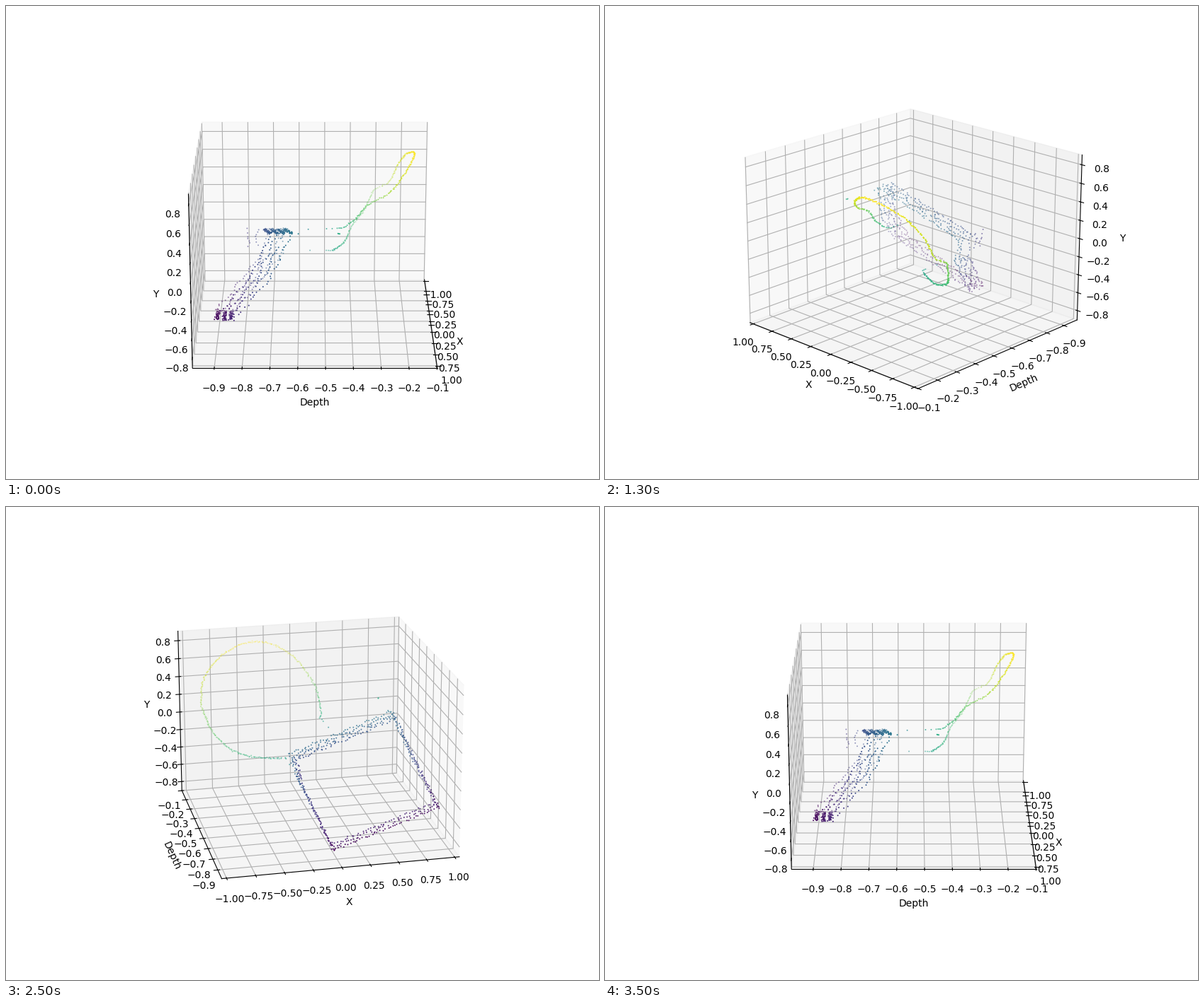
Animation, 837 px wide and 669 px high, one loop 3.6 s. Source, as a matplotlib script:

```python
import numpy as np
import matplotlib.pyplot as plt
from matplotlib.animation import FuncAnimation

FRAMES = 36
rng = np.random.default_rng(4)

# Each row is X, depth, Y.
HEAD = np.array([
    (-.268, -.471, -.233), (-.518, -.424, -.237), (-.702, -.399, -.160),
    (-.840, -.345, -.008), (-.903, -.310, .176), (-.914, -.279, .227),
    (-.896, -.245, .298), (-.861, -.220, .462), (-.709, -.192, .657),
    (-.450, -.162, .780), (-.212, -.177, .762), (-.035, -.218, .649),
    (.053, -.265, .529), (.105, -.342, .422), (.121, -.385, .288),
    (.116, -.427, .189), (.090, -.455, .166)])
TOP_L, LEFT = (-.289, -.694, 0), (-.228, -.698, -.243)
TOP_R, RIGHT = (.637, -.661, .339), (.774, -.731, -.057)
LOW_L, LOW_R = (-.028, -.879, -.799), (.910, -.864, -.452)
STRAY = [
    (.630, -.452, .330), (.634, -.449, .331), (.630, -.455, .333),
    (.630, -.598, .330), (.100, -.474, .165), (.100, -.495, .164),
    (.110, -.563, .162), (.110, -.642, .160), (-.240, -.480, -.220),
    (-.240, -.487, -.218), (-.240, -.495, -.217), (-.240, -.557, -.217)]


def smooth(pts, n):
    """Catmull-Rom curve through pts, evenly spaced by length."""
    p = np.vstack([2 * pts[0] - pts[1], pts, 2 * pts[-1] - pts[-2]])
    t = np.linspace(0, 1, 20, endpoint=False)[:, None]
    parts = []
    for a, b, c, d in zip(p, p[1:], p[2:], p[3:]):
        parts.append(b + .5 * t * (c - a + t * (2 * a - 5 * b + 4 * c - d
                                               + t * (3 * (b - c) + d - a))))
    return resample(np.vstack(parts + [pts[-1:]]), n)


def resample(pts, n):
    pts = np.asarray(pts, float)
    dist = np.r_[0, np.cumsum(np.linalg.norm(np.diff(pts, axis=0), axis=1))]
    s = np.linspace(0, dist[-1], n)
    return np.column_stack([np.interp(s, dist, col) for col in pts.T])


def strands(path, n, shifts, keep=.93):
    """Parallel copies of a path, shifted in depth and slightly wavy."""
    out = []
    for k, shift in enumerate(shifts):
        p = resample(path, n)
        p[:, 1] += shift + .005 * np.sin(np.arange(n) * .8 + 2 * k)
        p += rng.normal(0, (.006, .002, .006), p.shape)
        out.append(p[rng.random(n) < keep])
    return np.vstack(out)


def make_cloud():
    ring = smooth(HEAD, 290)
    ring += rng.normal(0, (.004, .0015, .004), ring.shape)
    layers = np.array([-.037, -.012, .012, .037])
    parts = [
        ring,
        strands([TOP_L, TOP_R], 44, layers),
        strands([TOP_R, RIGHT, LOW_R], 32, layers),
        strands([LOW_R, LOW_L], 46, layers[:3] + .012),
        strands([LEFT, LOW_L], 26, layers),
        strands([TOP_L, LEFT], 9, layers[2:], .8),
        strands([(-.28, -.73, 0), (-.255, -.73, -.17)], 8, (.005, -.028, -.062)),
        np.array(STRAY)]
    return np.vstack(parts)


# The small surplus keeps the pixel size from rounding down.
fig = plt.figure(figsize=(8.3701, 6.6901), dpi=100)
ax = fig.add_subplot(projection="3d")
x, depth, y = make_cloud().T
ax.scatter(x, depth, y, c=depth, cmap="viridis", s=2, linewidths=0)
ax.set(xlim=(-1.0417, 1.0417), ylim=(-.9785, -.0985), zlim=(-.905, .905),
       xlabel="X", ylabel="Depth", zlabel="Y")


def update(i):
    ax.view_init(elev=20, azim=360 * i / (FRAMES - 1))


anim = FuncAnimation(fig, update, frames=FRAMES, interval=100,
                     init_func=lambda: None, repeat=True, repeat_delay=0)
plt.show()
```
